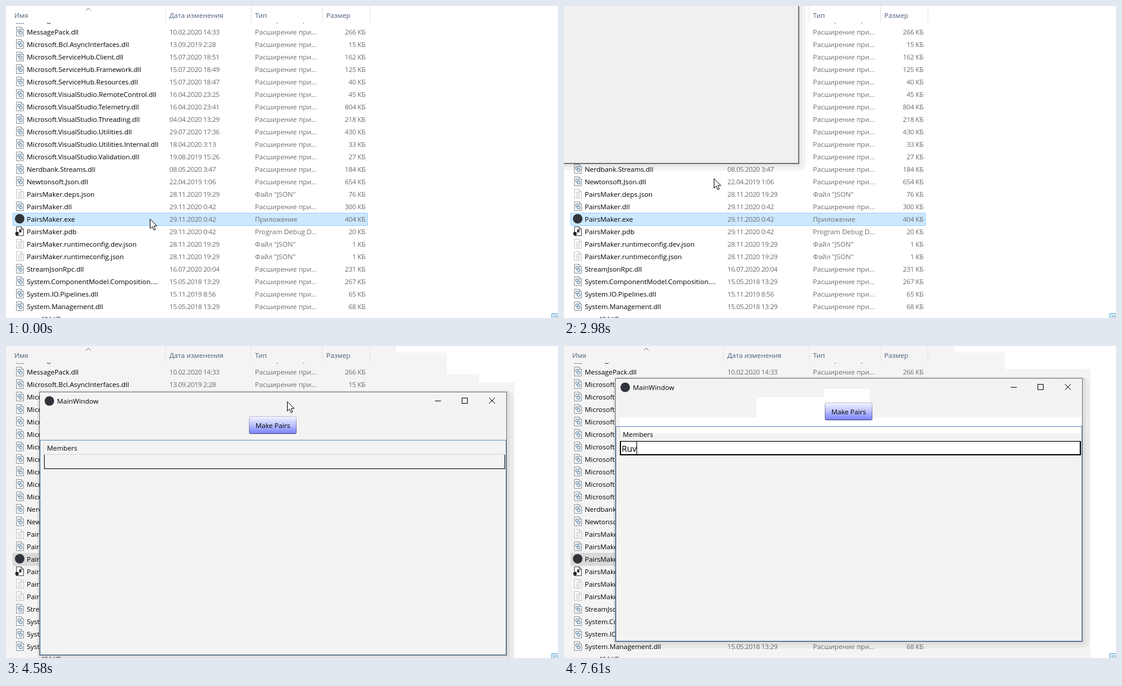
These frames come from a looping animation (929x525 px, 8 s). An HTML page with a canvas:

```html
<!DOCTYPE html>
<html lang="ru">
<head>
<meta charset="utf-8">
<style>
html, body { margin: 0; width: 100%; height: 100%; overflow: hidden; background: #fff; }
canvas { display: block; }
</style>
</head>
<body>
<canvas id="stage" width="929" height="525"></canvas>
<script>
const ctx = document.getElementById('stage').getContext('2d');
const LOOP = 8000, STEP = 60, DRAG = 4100, WIN_W = 785, WIN_H = 442;
const FACE = '"Open Sans", "Noto Sans", sans-serif';

// name | date | size in KB
const files = `MessagePack.Annotations.dll|10.02.2020 14:33|19
MessagePack.dll|10.02.2020 14:33|266
Microsoft.Bcl.AsyncInterfaces.dll|13.09.2019 2:28|15
Microsoft.ServiceHub.Client.dll|15.07.2020 18:51|162
Microsoft.ServiceHub.Framework.dll|15.07.2020 18:49|125
Microsoft.ServiceHub.Resources.dll|15.07.2020 18:47|40
Microsoft.VisualStudio.RemoteControl.dll|16.04.2020 23:25|45
Microsoft.VisualStudio.Telemetry.dll|16.04.2020 23:41|804
Microsoft.VisualStudio.Threading.dll|04.04.2020 13:29|218
Microsoft.VisualStudio.Utilities.dll|29.07.2020 17:36|430
Microsoft.VisualStudio.Utilities.Internal.dll|18.04.2020 3:13|33
Microsoft.VisualStudio.Validation.dll|19.08.2019 15:26|27
Nerdbank.Streams.dll|08.05.2020 3:47|184
Newtonsoft.Json.dll|22.04.2019 1:06|654
PairsMaker.deps.json|28.11.2020 19:29|76
PairsMaker.dll|29.11.2020 0:42|300
PairsMaker.exe|29.11.2020 0:42|404
PairsMaker.pdb|29.11.2020 0:42|20
PairsMaker.runtimeconfig.dev.json|28.11.2020 19:29|1
PairsMaker.runtimeconfig.json|28.11.2020 19:29|1
StreamJsonRpc.dll|16.07.2020 20:04|231
System.ComponentModel.Composition....|15.05.2018 13:29|267
System.IO.Pipelines.dll|15.11.2019 8:56|65
System.Management.dll|15.05.2018 13:29|68`.split('\n').map(s => s.split('|'));

const kinds = { json: 'Файл "JSON"', exe: 'Приложение', pdb: 'Program Debug D...' };

// Right edge and top of the window at each drag step
const drag = [[398, -174], [425, -150], [485, -100], [562, -35], [642, 24], [727, 60],
  [781, 74], [841, 78], [841, 78], [845, 76], [871, 52], [871, 55]];

// Mouse positions outside the drag: time, x, y
const mouse = [[0, 242, 358], [2980, 252, 290], [3040, 262, 126], [3100, 0, -99],
  [4760, 503, 70], [5320, 438, 84], [5380, 324, 101], [5440, 290, 140],
  [5500, 277, 158], [5560, 245, 158], [5620, 234, 163]];

function rect(x, y, w, h, color) {
  ctx.fillStyle = color;
  ctx.fillRect(x, y, w, h);
}

function frame(x, y, w, h, color) {
  ctx.strokeStyle = color;
  ctx.lineWidth = 1;
  ctx.strokeRect(x + .5, y + .5, w - 1, h - 1);
}

function path(points, color, width = 1) {
  ctx.beginPath();
  points.forEach(([x, y]) => ctx.lineTo(x, y));
  ctx.strokeStyle = color;
  ctx.lineWidth = width;
  ctx.stroke();
}

function disc(x, y, r, color) {
  ctx.beginPath();
  ctx.arc(x, y, r, 0, 7);
  ctx.fillStyle = color;
  ctx.fill();
}

function text(s, x, y, color = '#000', { size = 11.45, gap = 0, align = 'left' } = {}) {
  ctx.font = `${size}px ${FACE}`;
  ctx.letterSpacing = gap + 'px';
  ctx.textAlign = align;
  ctx.fillStyle = color;
  ctx.fillText(s, x, y);
}

function page(x, y, edge) {
  ctx.beginPath();
  [[0, 0], [8, 0], [12, 4], [12, 15], [0, 15]].forEach(([a, b]) => ctx.lineTo(x + a + .5, y + b + .5));
  ctx.closePath();
  ctx.fillStyle = '#fcfcfc';
  ctx.fill();
  ctx.strokeStyle = edge;
  ctx.lineWidth = 1;
  ctx.stroke();
  path([[x + 8.5, y + .5], [x + 8.5, y + 4.5], [x + 12.5, y + 4.5]], edge);
}

function icon(kind, y) {
  if (kind === 'exe') return disc(23, y, 8, '#30333a');
  if (kind === 'json') {
    page(17, y - 8, '#c4c4c4');
    for (let i = 0; i < 4; i++) rect(20, y - 3 + i * 2.5, 7, 1, '#c8c8c8');
  } else if (kind === 'pdb') {
    page(17, y - 8, '#444');
    disc(18.5, y + 4, 3, '#222');
    rect(22, y - 3, 4, 5, '#444');
  } else {
    page(17, y - 8, '#8c9298');
    ctx.lineWidth = 1.4;
    ctx.strokeStyle = '#7f9cb4';
    for (const [x, dy, r] of [[22, -1.5, 2.3], [24.7, 2, 2.5]]) {
      ctx.beginPath();
      ctx.arc(x, y + dy, r, 0, 7);
      ctx.stroke();
    }
  }
}

function explorer(t) {
  for (const x of [268, 412, 532, 612]) rect(x, 0, 1, 28, '#e4e4e4');
  const heads = { 14: 'Имя', 275: 'Дата изменения', 419: 'Тип', 539: 'Размер' };
  for (const x in heads) text(heads[x], +x, 20, '#4c607a');
  path([[134.5, 7.5], [138.5, 3.5], [142.5, 7.5]], '#666');

  ctx.save();
  ctx.beginPath();
  ctx.rect(0, 28, 929, 497);
  ctx.clip();
  files.forEach(([name, date, size], i) => {
    const y = 22 + 21 * i, kind = name.split('.').pop(), gray = '#6d6d6d';
    if (kind === 'exe') {
      const active = t < 3040;
      rect(11, y - 10, 598, 22, active ? '#cce8ff' : '#d9d9d9');
      if (active) frame(11, y - 10, 598, 22, '#99d1ff');
    }
    icon(kind, y);
    text(name, 35, y + 5);
    text(date, 275, y + 5, gray, { gap: -.4 });
    text(kinds[kind] || 'Расширение при...', 419, y + 5, gray);
    text(size + ' КБ', 605, y + 5, gray, { gap: -.3, align: 'right' });
  });
  ctx.restore();
  text('404 КБ', 58, 531, '#333', { gap: -.3 });
  rect(918, 517, 11, 8, '#d3ebfb');
  frame(918, 517, 14, 12, '#58a9dc');
  frame(922, 521, 6, 6, '#8aa4b8');
}

// Areas of the list left slightly gray after repaints
function repaints(t, step) {
  if (t >= 3040) rect(11, 126, 598, 251, '#f6f6f6');
  for (let k = 0; k <= step; k++) {
    if (!k) { rect(0, 0, 413, 290, '#fff'); continue; }
    const [a, b] = [drag[k - 1], drag[k]];
    const left = Math.max(0, Math.min(a[0], b[0]) - WIN_W - 16);
    const top = Math.max(0, Math.min(a[1], b[1]) - 13);
    const right = Math.max(a[0], b[0]) + 15;
    rect(left, top, right - left, Math.max(a[1], b[1]) + WIN_H + 21 - top, '#f4f4f4');
  }
}

function shadow(x, y) {
  ctx.fillStyle = 'rgba(0,0,0,.045)';
  for (const d of [12, 6]) {
    ctx.beginPath();
    ctx.roundRect(x - 4, y - 3, WIN_W + 4 + d, WIN_H + 3 + d, d);
    ctx.fill();
  }
}

function shade(y, height, ...colors) {
  const g = ctx.createLinearGradient(0, y, 0, y + height);
  colors.forEach((c, i) => g.addColorStop(i / (colors.length - 1), c));
  return g;
}

function button(x, y) {
  ctx.beginPath();
  ctx.roundRect(x + .5, y + .5, 79, 29, 2);
  ctx.fillStyle = shade(y, 30, '#f6f6ff', '#bcc1fd', '#757efb');
  ctx.fill();
  ctx.strokeStyle = shade(y, 30, '#c3c3d2', '#8286b8', '#464a78');
  ctx.lineWidth = 1;
  ctx.stroke();
  text('Make Pairs', x + 11, y + 20);
}

function editor(t) {
  rect(94, 160, 776, 24, '#000');
  rect(96, 161, 772, 21, '#fff');
  const typed = 'Ruv'.slice(0, (t >= 6850) + (t >= 7550) + (t >= 7610));
  const size = 14.6;
  text(typed, 97, 178, '#000', { size });
  const caretOn = t < 6410 || (t >= 6850 && t < 7430) || t >= 7550;
  if (caretOn) rect(97 + Math.round(ctx.measureText(typed).width), 161, 1, 21, '#000');
}

function appWindow(t, x, y) {
  const hover = t >= 5440 && t < 5620;
  shadow(x, y);
  rect(x, y, WIN_W, WIN_H, t < 4160 ? '#f0f0f0' : '#f3f3f3');
  if (t >= 5320) rect(438, 72, 76, 23, '#fff');
  if (t >= 5380) rect(324, 86, 114, 34, '#fff');
  if (t >= 5440) rect(94, 120, 776, 15, '#fff');
  if (t >= 5560) rect(244, 163, 45, 14, '#fff');

  disc(x + 16, y + 14.5, 8, '#30333a');
  text('MainWindow', x + 29, y + 19);
  rect(x + 665, y + 14, 10, 1, '#000');
  frame(x + 710, y + 9, 10, 10, '#000');
  path([[x + 756, y + 9], [x + 766, y + 19]], '#000');
  path([[x + 766, y + 9], [x + 756, y + 19]], '#000');
  button(x + 352, y + 40);

  frame(x, y + 80, WIN_W, WIN_H - 80, t < 4160 ? '#777' : '#6088b8');
  rect(x + 7, y + 104, 776, 1, '#d5d5d5');
  rect(x + 6, y + 82, 1, 23, '#dcdcdc');
  if (hover) {
    rect(x + 7, y + 81, 776, 11, '#e3f6fe');
    rect(x + 7, y + 92, 776, 13, '#bbe8fc');
    frame(x + 7, y + 81, 776, 24, '#94d2ee');
  } else if (t >= 5620) rect(x + 8, y + 81, 775, 11, '#fff');
  text('Members', x + 12, y + 98);
  rect(x + 7, y + 105, 1, 24, '#000');
  rect(x + 7, y + 128, 776, 1, '#000');
  rect(x + 782, y + 105, 1, 24, '#000');
  frame(x - 1, y - 1, WIN_W + 2, WIN_H + 2, '#6c7278');
  if (t >= 5850) editor(t);
}

function arrow(x, y) {
  ctx.beginPath();
  [[0, 0], [0, 16], [3.7, 12.6], [6.3, 18.5], [8.9, 17.4], [6.4, 11.6], [11.4, 11.6]]
    .forEach(([a, b]) => ctx.lineTo(x + a + .5, y + b + .5));
  ctx.closePath();
  ctx.fillStyle = '#fff';
  ctx.fill();
  ctx.strokeStyle = '#000';
  ctx.lineWidth = 1;
  ctx.stroke();
}

function busyRing(x, y) {
  ctx.lineWidth = 3;
  for (const [from, to, color] of [[0, 7, '#8fd0f5'], [-2, 1.5, '#1b87d6']]) {
    ctx.beginPath();
    ctx.arc(x, y, 6.5, from, to);
    ctx.strokeStyle = color;
    ctx.stroke();
  }
}

function pointer(t, step) {
  if (t >= 5850) {
    if (t < 6910) {
      rect(231, 160, 1, 17, '#000');
      rect(228, 159, 7, 1, '#000');
      rect(228, 177, 7, 1, '#000');
    }
    return;
  }
  if (t >= 810 && t < 930) busyRing(255.5, 358.5);
  if (step >= 0 && t < 4760) {
    // The mouse runs a little ahead of the dragged window
    const [a, b] = [drag[step], drag[step + 1]];
    arrow(Math.round(a[0] - WIN_W + 417 + .1 * (b[0] - a[0])),
      Math.round(a[1] + 15 + .25 * (b[1] - a[1])));
  } else {
    const [, x, y] = mouse.findLast(m => m[0] <= t);
    arrow(x, y);
  }
}

function draw() {
  const t = performance.now() % LOOP;
  const step = Math.min(drag.length - 1, Math.floor((t - DRAG) / STEP));
  rect(0, 0, 929, 525, '#fff');
  repaints(t, step);
  explorer(t);
  if (t >= 1180) {
    const [right, top] = step < 0 ? [395, -177] : drag[step];
    const open = Math.min(1, (Math.floor((t - 1180) / STEP) + 1) / 5);
    const scale = 1 - .1 * (1 - open) ** 2;
    ctx.save();
    ctx.globalAlpha = 1 - (1 - open) ** 1.5;
    ctx.translate(2.5 * (1 - scale), 44 * (1 - scale));
    ctx.scale(scale, scale);
    appWindow(t, right + 1 - WIN_W - (step < 0), top);
    ctx.restore();
  }
  pointer(t, step);
  requestAnimationFrame(draw);
}
requestAnimationFrame(draw);
</script>
</body>
</html>
```
